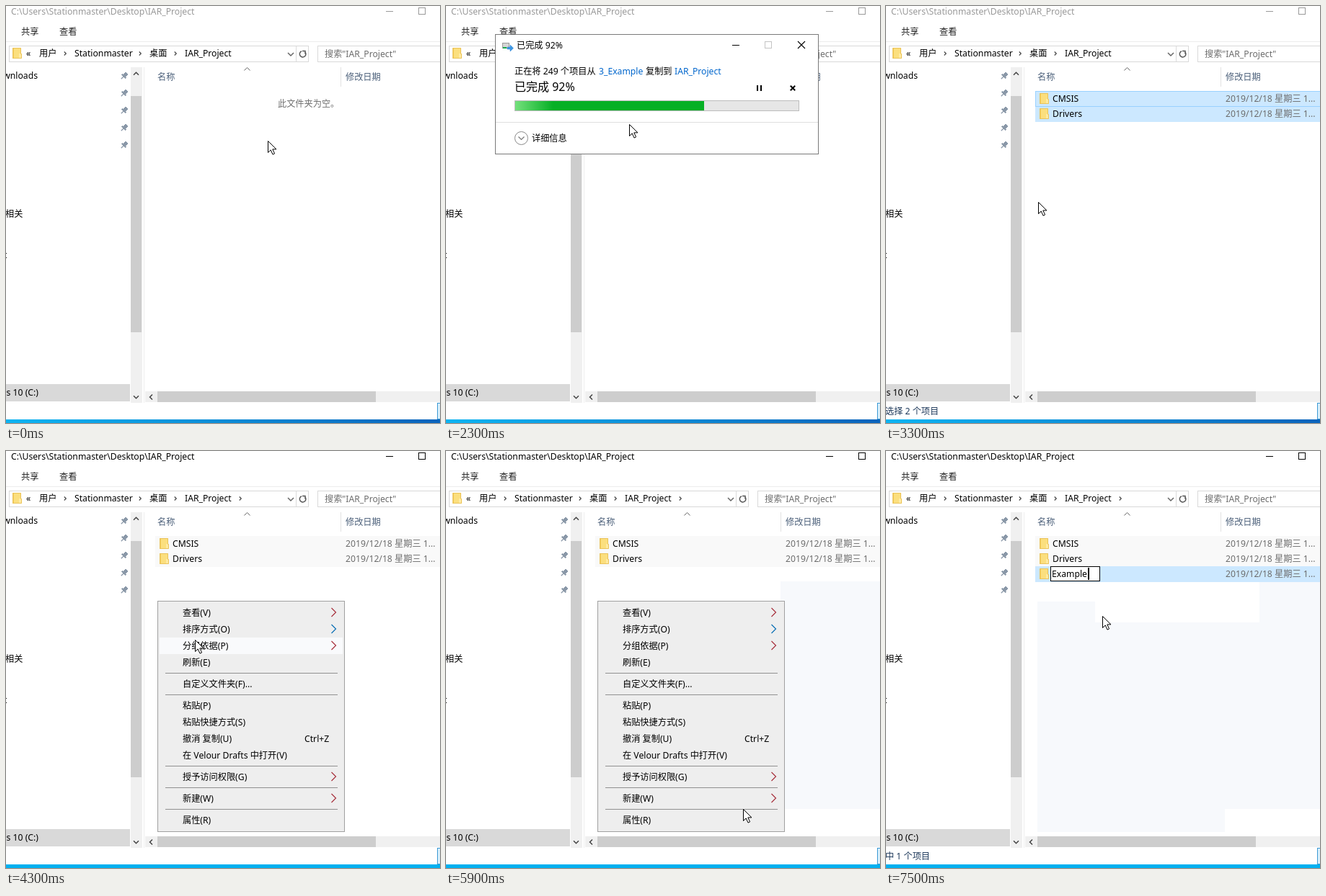
Animation of 602x579 px, one loop 8 s. Source, as an HTML page:

```html
<!DOCTYPE html>
<html lang="zh">
<head>
<meta charset="utf-8">
<style>
html, body { margin: 0; width: 100%; height: 100%; overflow: hidden; background: #fff; }
svg { display: block; width: 602px; height: 579px; font: 12.2px "Noto Sans", "Noto Sans CJK SC", "Noto Sans CJK", sans-serif; }
text { white-space: pre; }
rect { shape-rendering: crispEdges; }
</style>
</head>
<body>
<svg id="stage" viewBox="0 0 602 579"></svg>
<script>
const LOOP = 8000;
const USER = 'Stationmaster';
const TINT = '#f7f9fc', GREY = '#6d6d6d', LINK = '#0066cc';

// Drawing helpers, all returning SVG markup
const text = (x, y, s, fill = '#000', extra = '') => `<text x="${x}" y="${y}" fill="${fill}" ${extra}>${s}</text>`;
const rect = (x, y, w, h, fill) => `<rect x="${x}" y="${y}" width="${w}" height="${h}" fill="${fill}"/>`;
const box = (x, y, w, h, fill, line) => rect(x, y, w, h, line) + rect(x + 1, y + 1, w - 2, h - 2, fill);
const path = (d, stroke, width = 1, fill = 'none') => `<path d="${d}" stroke="${stroke}" stroke-width="${width}" fill="${fill}"/>`;
const right = (x, y, r, color, w = 1.2) => path(`M${x - r / 2} ${y - r}l${r} ${r}l${-r} ${r}`, color, w);
const vertical = (x, y, r, dir, color, w = 1.5) => path(`M${x - r} ${y - dir * r / 2}l${r} ${dir * r}l${r} ${-dir * r}`, color, w);
const cross = (x, y, r, w) => path(`M${x - r} ${y - r}l${2 * r} ${2 * r}m0 ${-2 * r}l${-2 * r} ${2 * r}`, '#000', w);

const folder = (x, y) => rect(x, y, 12, 15, '#fbdf7e') + rect(x, y, 2, 15, '#f3cc5c') +
  rect(x + 9, y + 8, 4, 7, '#ffeaa3') + path(`M${x + .5} ${y + .5}h11v8h1v6h-12z`, '#eac35a');

const pointer = ([x, y]) =>
  path(`M${x + .5} ${y + .5}v16l3.7-3.6l2.8 6.2l2.6-1.2l-2.8-6h5.2z`, '#000', 1, '#fff');

const pin = y => `<g transform="translate(164 ${y}) rotate(45)">` + rect(-2.5, -5, 5, 5, '#8a98a8') +
  rect(-4, 0, 8, 1.5, '#8a98a8') + path('M0 1v5', '#8a98a8', 1.2) + '</g>';

function menu({ x, y, w, items }, hover) {
  let out = box(x, y, w, items.height, '#eeeeee', '#a0a0a0'), top = y + 5;
  items.forEach((item, i) => {
    if (item === '-') {
      out += rect(x + 11, top + 3, w - 21, 1, '#919191');
      top += 7;
      return;
    }
    const [label, key] = item.replace('>', '').split('|');
    if (label === hover) out += rect(x + 3, top, w - 6, 23, '#f9fafc');
    out += text(x + 35, top + 16, label);
    if (key) out += text(x + 204, top + 16, key);
    if (item.endsWith('>')) out += right(x + 244.5, top + 11, 6, i === 1 ? '#0a6fb5' : '#a8323e');
    top += 23;
  });
  return out;
}

function makeMenu(x, y, w, list) {
  const items = list.split(',');
  items.height = 10 + items.reduce((sum, s) => sum + (s === '-' ? 7 : 23), 0);
  return { x, y, w, items };
}

const OPEN_WITH = '在 Velour Drafts 中打开(V)';
const MENUS = {
  main: makeMenu(210, 208, 260, '查看(V)>,排序方式(O)>,分组依据(P)>,刷新(E),-,自定义文件夹(F)...,-,粘贴(P),粘贴快捷方式(S),' +
    `撤消 复制(U)|Ctrl+Z,${OPEN_WITH},-,授予访问权限(G)>,-,新建(W)>,-,属性(R)`),
  group: makeMenu(467, 256, 160, '名称,修改日期,类型,大小,-,递增(A),递减(D),-,更多(M)...'),
  create: makeMenu(464, 181, 240, '文件夹(F),快捷方式(S),-,联系人,位图图像,文字文档,数据库,演示文稿,图形文件,RTF 格式,文本文档,表格,日记本文档,压缩文件')
};

// Each step only lists what differs from the one before
const STEPS = [
  { at: 0, cursor: [363, 187] },
  { at: 100, active: true },
  { at: 300, active: false },
  { at: 2300, cursor: [254, 164], done: 92, bar: 262 },
  { at: 2500, cursor: [251, 172], done: 95, bar: 310 },
  { at: 2700, done: 99, bar: 370 },
  { at: 2900, cursor: [242, 235], done: 0, files: true, selected: true, status: '选择 2 个项目' },
  { at: 3100, cursor: [217, 264] },
  { at: 3300, cursor: [211, 272] },
  { at: 3500, cursor: [211, 240], active: true, selected: false, status: '' },
  { at: 3700, cursor: [210, 208] },
  { at: 3900, main: true },
  { at: 4100, cursor: [245, 240], hover: '排序方式(O)' },
  { at: 4300, cursor: [262, 262], hover: '分组依据(P)' },
  { at: 4500, cursor: [258, 275], sub: 'group' },
  { at: 4700, cursor: [256, 350], hover: '粘贴(P)' },
  { at: 4900, cursor: [254, 436], hover: OPEN_WITH, sub: '', tint: 1 },
  { at: 5100, cursor: [275, 476], hover: '新建(W)' },
  { at: 5300, cursor: [400, 484], sub: 'create' },
  { at: 5900, cursor: [412, 497], hover: '', sub: '', tint: 2 },
  { at: 6100, cursor: [430, 487], hover: '新建(W)' },
  { at: 6300, cursor: [480, 440], sub: 'create' },
  { at: 6500, cursor: [487, 290] },
  { at: 6700, cursor: [491, 199], hover: '文件夹(F)' },
  { at: 6900, main: false, sub: '', tint: 3, name: '新建文件夹', width: 62, status: '中 1 个项目' },
  { at: 7100, cursor: [430, 210], name: 'E', width: 7, cleared: true },
  { at: 7300, cursor: [350, 222], name: 'Exam', width: 33 },
  { at: 7500, cursor: [300, 229], name: 'Example', width: 51 }
];
STEPS.forEach((step, i) => { STEPS[i] = { ...STEPS[i - 1], ...step }; });

function chrome({ active, status = '' }) {
  const ink = active ? '#000' : '#999';
  const edge = active ? '#00b0f0' : 'url(#edge)';
  let out = '<linearGradient id="edge"><stop stop-color="#0cb4f2"/><stop offset="1" stop-color="#0a64bc"/></linearGradient>' +
    text(7, 12, `C:\\Users\\${USER}\\Desktop\\IAR_Project`, ink) +
    rect(527, 7, 10, 1, ink) + box(572, 2, 10, 10, '#fff', ink) +
    text(21, 40, '共享', '#222') + text(74, 40, '查看', '#222') + rect(0, 49, 602, 1, '#ececec') +
    box(4, 55, 416, 23, '#fff', '#d9d9d9') + rect(402, 55, 1, 23, '#d9d9d9') + folder(9, 58) +
    text(28, 70, '«') + text(46, 70, '用户') + text(95, 70, USER) + text(199, 70, '桌面') + text(248, 70, 'IAR_Project') +
    [82, 186, 235].concat(active ? 325 : []).map(x => right(x, 66, 2.5, '#444')).join('') +
    vertical(395, 67, 4, 1, '#666') +
    path('M414.5 63.5a4.3 4.3 0 1 1-4.5-.8M411 62.5h4v4', '#555', 1.5) +
    box(432, 55, 180, 23, '#fff', '#d9d9d9') + text(442, 71, '搜索"IAR_Project"', GREY);

  out += text(44, 101, 'wnloads', '#000', 'text-anchor="end"');
  for (let i = 0; i < 5; i++) out += pin(97 + 24 * i);
  out += text(-1, 293, '相关') + text(-3, 350, 't') + rect(0, 525, 172, 24, '#d9d9d9') +
    text(45, 541, 's 10 (C:)', '#000', 'text-anchor="end"') +
    rect(173, 85, 16, 466, '#f0f0f0') + rect(173, 125, 15, 328, '#cdcdcd') +
    vertical(180.5, 94, 3.5, -1, '#444') + vertical(180.5, 543, 3.5, 1, '#444') + rect(191, 85, 1, 466, '#eee');

  return out + vertical(334.5, 87.5, 4, -1, '#666', 1) + text(210, 103, '名称', '#4c607a') +
    rect(464, 85, 1, 27, '#e2e2e2') + text(471, 103, '修改日期', '#4c607a') +
    rect(193, 535, 409, 15, '#f0f0f0') + rect(210, 535, 303, 15, '#cdcdcd') +
    path('M203 539.5l-3.5 3.5l3.5 3.5', '#444', 1.5) + text(-1, 567, status, '#1e395b') +
    box(598, 551, 20, 23, '#d9effb', '#3c99d4') + rect(0, 574, 602, 5, edge);
}

function row(y, name) {
  return folder(213, y + 3) + text(231, y + 15, name) + text(471, y + 15, '2019/12/18 星期三 1...', GREY);
}

function list({ files, selected, tint = 0, cleared, cursor, name, width }) {
  if (!files) return text(377, 140, '此文件夹为空。', GREY);
  let out = '';
  if (tint === 1) out += rect(470, 256, 132, 185, TINT);
  if (tint > 1) out += rect(464, 181, 138, 316, TINT);
  if (tint > 2) out += rect(210, 209, 260, 320, TINT);
  if (cleared) out += rect(cursor[0] - 10, 181, 528 - cursor[0], cursor[1] - 172, '#fff');
  out += selected
    ? box(207, 118, 400, 22, '#cce8ff', '#99d1ff') + rect(207, 140, 395, 21, '#cce8ff')
    : rect(207, 118, 395, 43, '#f9f9f9');
  out += row(118, 'CMSIS') + row(139, 'Drivers');
  if (!name) return out;
  out += rect(207, 160, 395, 22, '#cce8ff') + row(160, '') + box(228, 160, width + 18, 21, '#fff', '#000');
  if (!cleared) out += rect(230, 162, 61, 17, '#0078d7');
  return out + text(230, 175, name, cleared ? '#000' : '#fff') + rect(229 + width, 162, 2, 17, '#000');
}

function copyDialog({ done, bar }) {
  if (!done) return '';
  return '<linearGradient id="glow"><stop stop-color="#74e07c"/><stop offset=".2" stop-color="#06b025"/></linearGradient>' +
    box(68, 39, 449, 167, '#fff', '#7a7a7a') +
    box(78, 51, 10, 8, '#d5d5d5', '#999') + rect(79, 57, 5, 2, '#19a94b') +
    path('M85 57h4v-3l4.5 4.5l-4.5 4.5v-3h-4z', '#2d83d0', .5, '#3d97e3') +
    text(98, 59, `已完成 ${done}%`) +
    rect(397, 54, 10, 1, '#000') + box(442, 49, 10, 10, '#fff', '#c4c4c4') + cross(493, 54, 5, 1.1) +
    text(95, 95, '正在将 249 个项目从') + text(212, 95, '3_Example', LINK) +
    text(277, 95, '复制到') + text(317, 95, 'IAR_Project', LINK) +
    text(95, 118, `已完成 ${done}%`, '#000', 'font-size="16"') +
    rect(431, 110, 2, 8, '#000') + rect(436, 110, 2, 8, '#000') + cross(481, 114, 3.2, 2) +
    box(95, 131, 395, 15, '#e6e6e6', '#bcbcbc') + rect(96, 132, bar, 13, 'url(#glow)') +
    rect(69, 161, 447, 1, '#dfdfdf') +
    '<circle cx="104.5" cy="183.5" r="9" fill="none" stroke="#8a8a8a"/>' +
    vertical(104.5, 183.5, 4, 1, '#777', 1.2) + text(119, 188, '详细信息');
}

function draw(s) {
  return chrome(s) + list(s) + copyDialog(s) +
    (s.main ? menu(MENUS.main, s.hover) : '') +
    (s.sub ? menu(MENUS[s.sub], s.hover) : '') + pointer(s.cursor);
}

const stage = document.getElementById('stage');
let shown;
function tick() {
  const time = performance.now() % LOOP;
  const step = STEPS.findLast(s => s.at <= time);
  if (step !== shown) stage.innerHTML = draw(shown = step);
  requestAnimationFrame(tick);
}
tick();
</script>
</body>
</html>
```
